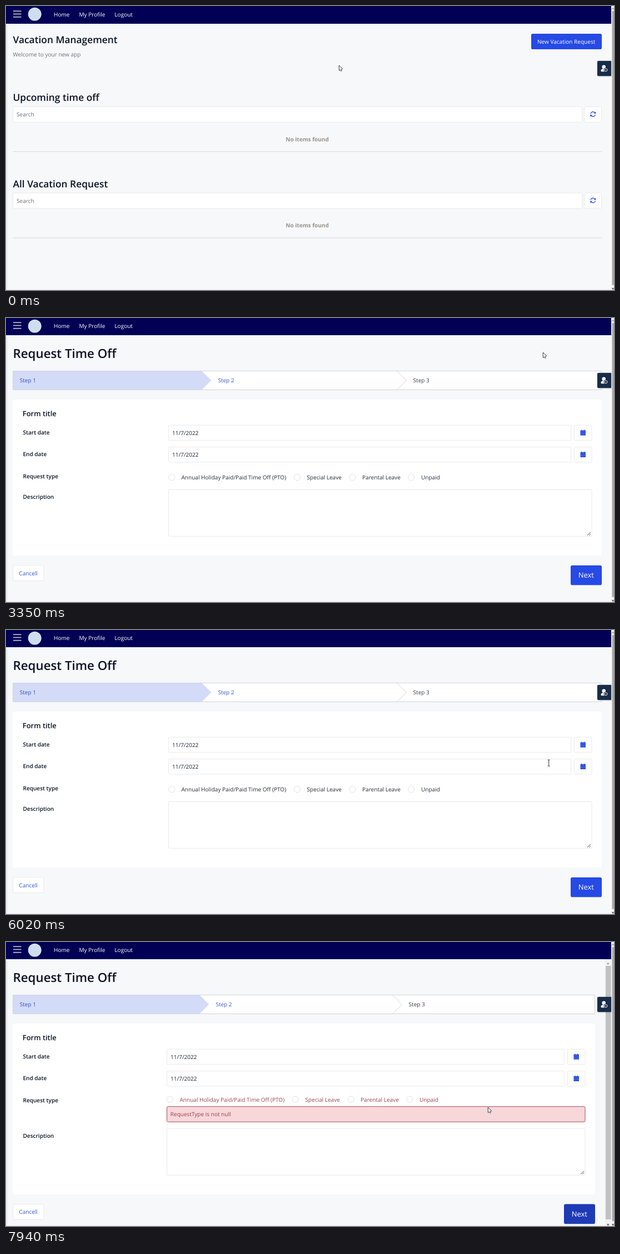
These frames come from a looping animation (1094x512 px, 8000 ms). An HTML page with a canvas:

```html
<!DOCTYPE html>
<html lang="en">
<head>
<meta charset="utf-8">
<title>Time off</title>
<style>
html, body { margin: 0; width: 100%; height: 100%; overflow: hidden; background: #f7f8fa; }
canvas { display: block; width: 1094px; height: 512px; }
</style>
</head>
<body>
<canvas id="stage" width="1094" height="512"></canvas>
<script>
const ctx = document.getElementById('stage').getContext('2d');
const LOOP = 8000, SHIFT_AT = 2100, FORM_AT = 3050, ERROR_AT = 7250;
const BLUE = '#264ae5', BLUE_DARK = '#1e3ab5', INK = '#0a1325', EDGE = '#e7e9ec';
const BODY = 10.05, H1 = 22.3, H2 = 17.35, H3 = 12.95;

// Stops of the pointer: time, x, y
const STOPS = [
  [0, 599, 107], [1050, 954, 68], [1430, 955, 67], [1700, 938, 186], [2500, 887, 61],
  [2900, 966, 62], [3360, 966, 62], [4160, 350, 208], [4858, 350, 219], [5820, 943, 239],
  [6150, 994, 240], [6840, 1040, 448], [7300, 1040, 461], [7940, 867, 298], [LOOP, 867, 298]
];

let pointer, cursor;

function pointerAt(t) {
  const i = STOPS.findIndex(stop => stop[0] > t);
  const [t0, x0, y0] = STOPS[i - 1], [t1, x1, y1] = STOPS[i];
  const u = (t - t0) / (t1 - t0), ease = u * u * (3 - 2 * u);
  return { x: x0 + (x1 - x0) * ease, y: y0 + (y1 - y0) * ease };
}

// True while the pointer is inside the control; also picks the cursor
function hovered(x, y, w, h, kind) {
  const inside = Math.abs(pointer.x - x - w / 2) < w / 2 - 3 &&
    Math.abs(pointer.y - y - h / 2) < h / 2 - 3;
  if (inside) cursor = kind;
  return inside;
}

// y is the middle of the capitals; returns the right end
function text(s, x, y, color = INK, size = BODY, weight = 400) {
  ctx.font = `${weight} ${size}px "Open Sans", sans-serif`;
  ctx.textRendering = 'geometricPrecision';
  ctx.fillStyle = color;
  ctx.fillText(s, x, y + size * 0.357);
  return x + ctx.measureText(s).width;
}

function paint(fill, stroke, width = 1) {
  if (fill) { ctx.fillStyle = fill; ctx.fill(); }
  if (stroke) { ctx.strokeStyle = stroke; ctx.lineWidth = width; ctx.stroke(); }
}

function box(x, y, w, h, fill, stroke, radius = 2) {
  ctx.beginPath();
  ctx.roundRect(x, y, w, h, radius);
  paint(fill, stroke);
}

function rect(x, y, w, h, fill) {
  ctx.fillStyle = fill;
  ctx.fillRect(x, y, w, h);
}

function disc(x, y, r, fill, stroke) {
  ctx.beginPath();
  ctx.arc(x, y, r, 0, 2 * Math.PI);
  paint(fill, stroke);
}

function polygon(points, fill, stroke, width) {
  ctx.beginPath();
  for (const [x, y] of points) ctx.lineTo(x, y);
  ctx.closePath();
  paint(fill, stroke, width);
}

function line(x0, y0, x1, y1, color, width = 1) {
  ctx.beginPath();
  ctx.moveTo(x0, y0);
  ctx.lineTo(x1, y1);
  paint(null, color, width);
}

function triangle(x, y, size, dir, color) {
  polygon([[x - size, y], [x + size, y], [x, y + size * 1.2 * dir]], color);
}

function field(x, y, w, h) {
  box(x, y, w, h, '#fff', EDGE);
  hovered(x, y, w, h, 'beam');
}

function primaryButton(label, x, y, w, h, size, active) {
  const hover = hovered(x, y, w, h, 'hand');
  box(x, y, w, h, hover || active ? BLUE_DARK : BLUE, null, 2.8);
  const pad = size > BODY ? 13.8 : 11;
  text(label, x + pad, y + h / 2, '#fff', size, size > BODY ? 400 : 500);
}

function header(height) {
  const mid = height - 17;
  rect(0, 0, 1089, height, '#020054');
  for (let i = -1; i <= 1; i++) rect(13, mid - 1.4 + i * 5.3, 14.5, 1.8, '#b4b6c8');
  disc(51.7, 14.8, 12, '#cfdeef');
  let x = 86;
  for (const label of ['Home', 'My Profile', 'Logout']) x = text(label, x, mid + 0.3, '#fff', BODY, 500) + 17;
}

function refreshIcon(x, y) {
  ctx.save();
  ctx.translate(x, y);
  for (let half = 0; half < 2; half++) {
    ctx.beginPath();
    ctx.arc(0, 0, 4.2, Math.PI * 1.06, Math.PI * 1.8);
    paint(null, BLUE, 1.4);
    polygon([[5.1, -4.8], [5.1, -0.9], [1.3, -0.9]], BLUE);
    ctx.rotate(Math.PI);
  }
  ctx.restore();
}

function listSection(title, y) {
  text(title, 12.5, y, INK, H2, 600);
  field(12.5, y + 16.5, 1024.5, 28);
  text('Search', 19, y + 30.7, '#6b707b');
  box(1040.5, y + 16.5, 31, 28, '#fff', EDGE);
  refreshIcon(1056.2, y + 30);
  text('No items found', 503.3, y + 75, '#97928a', BODY, 700);
  rect(12.5, y + 97, 1059.5, 1, '#d7dadf');
}

function homePage(shift) {
  ctx.save();
  ctx.translate(0, -shift);
  text('Vacation Management', 12.5, 61.3, INK, H2, 600);
  text('Welcome to your new app', 12.5, 87, '#6c717e');
  primaryButton('New Vacation Request', 945, 50, 127, 28, BODY);
  listSection('Upcoming time off', 165);
  listSection('All Vacation Request', 320.5);
  ctx.restore();
}

function stepper(width) {
  const left = 12.5, top = 95.5, h = 34, mid = top + h / 2;
  box(left, top, width, h, '#fff', '#d0d4da');
  const tips = [1, 2].map(i => left + width * i / 3 + 5.5 - i * 1.8);
  polygon([[left, top], [tips[0] - 17, top], [tips[0], mid], [tips[0] - 17, top + h], [left, top + h]], '#d3dbf8');
  line(tips[1] - 17, top, tips[1], mid, '#c9cdd4', 0.8);
  line(tips[1] - 17, top + h, tips[1], mid, '#c9cdd4', 0.8);
  box(left, top, width, h, null, '#d0d4da');
  ['#3453ab', '#3a5bd9', '#3b404c'].forEach((color, i) =>
    text(`Step ${i + 1}`, (i ? tips[i - 1] : left) + 12.2, mid + 0.3, color));
}

function dateField(label, y, left, right) {
  text(label, 30.5, y - 0.7, INK, BODY, 600);
  field(left, y - 13.5, right - 37.5 - left, 27.5);
  text('11/7/2022', left + 6.5, y + 0.3, '#1d2433');
  box(right - 31.5, y - 13.5, 31.5, 27.5, '#fff', EDGE);
  const x = right - 20.5;
  for (const dx of [1.8, 6.3]) rect(x + dx, y - 5.3, 1.4, 2, BLUE);
  rect(x, y - 4, 9.5, 9, BLUE);
  for (let row = 0; row < 3; row++) rect(x, y - 2.2 + row * 2.4, 9.5, 0.4, '#8296f0');
}

function formPage(error) {
  const cut = error ? 12 : 0, drop = error ? 26.6 : 0;
  const left = error ? 289.5 : 292.5, right = 1054 - cut, edge = 1072 - cut;
  text('Request Time Off', 12.5, 64, INK, H1, 600);
  stepper(edge - 13);
  box(12, 147, edge - 12, 281.3 + drop, '#fff');
  text('Form title', 29.8, 172.8, INK, H3, 600);
  dateField('Start date', 206.7, left, right);
  dateField('End date', 246, left, right);

  text('Request type', 30.5, 285, INK, BODY, 600);
  const radioY = error ? 284 : 287.3;
  let x = left + 5.5;
  for (const label of ['Annual Holiday Paid/Paid Time Off (PTO)', 'Special Leave', 'Parental Leave', 'Unpaid']) {
    disc(x, radioY, 5.6, '#fff', '#e0e2e6');
    x = text(label, x + 17.5, radioY, error ? '#9c444b' : '#262c39') + 19.7;
  }
  if (error) {
    box(left, 296.7, right - left, 27.6, '#f8d7da', '#a8515e');
    text('RequestType is not null', left + 6.3, 310.8, '#97404a');
  }

  text('Description', 30.5, 322.5 + drop, INK, BODY, 600);
  field(left, 309.5 + drop, right - left, 84.2);
  for (const d of [6, 2.8]) line(right - 2 - d, 392 + drop, right - 2, 392 + drop - d, '#3d3d3d', 0.9);

  box(12.5, 446 + drop, 55.5, 27.7, '#fff', EDGE);
  text('Cancell', 23.3, 460.2 + drop, '#3355dc');
  primaryButton('Next', edge - 56, 446 + drop, 56, 35.6, H3, error);
}

function scrollbar(x, top, width, thumbTop, thumbColor) {
  const thumbBottom = 512 - (thumbTop - top);
  rect(x, top, width, 512 - top, '#f1f1f1');
  rect(x + 1, thumbTop, width - 1, thumbBottom - thumbTop, thumbColor);
  triangle(x + width / 2, thumbTop - 3, 2.4, -1, '#9b9b9b');
  triangle(x + width / 2, 508.5, 2.4, 1, '#505050');
}

function pageFrame() {
  const shade = ctx.createLinearGradient(0, 0, 4, 0);
  shade.addColorStop(0, 'rgba(60,65,80,.09)');
  shade.addColorStop(1, 'rgba(60,65,80,0)');
  rect(0, 32, 4, 480, shade);
  ctx.setLineDash([2, 2]);
  line(0, 511.5, 1089, 511.5, '#dfe1e5');
  ctx.setLineDash([]);
  scrollbar(1089.5, 0, 5, 9, '#a9a9a9');
}

function sideTab() {
  ctx.save();
  ctx.shadowColor = 'rgba(0,0,0,.25)';
  ctx.shadowBlur = 3;
  box(1064, 99, 25, 27.3, '#182c49', null, [2, 0, 0, 2]);
  ctx.restore();
  box(1070.5, 113.3, 9.5, 4.9, '#fff', null, [3.5, 0, 0, 1]);
  disc(1075.7, 109.7, 3.3, '#fff');
  disc(1079.4, 115.3, 3.8, '#182c49');
  disc(1079.4, 115.3, 2.5, null, '#fff');
}

const CURSORS = {
  arrow() {
    line(2.5, 6, 4.5, 10.6, '#22222c', 2.6);
    polygon([[0.3, 0], [0.3, 9.3], [6.7, 6.5]], '#fff', '#22222c', 0.9);
    line(2.4, 6, 4.3, 10.2, '#fff', 1.1);
  },
  beam() {
    line(0, -5, 0, 5, '#333');
    for (const y of [-5.5, 5.5]) line(-2, y, 2, y, '#333');
  },
  hand() {
    box(-2.8, 4.5, 8, 8, '#fff', '#171b33', [2, 2, 3, 4]);
    box(-0.8, 0, 2, 7, '#fff', '#171b33', 1);
    rect(-0.3, 4, 1.2, 5, '#fff');
  }
};

function draw(t) {
  const error = t >= ERROR_AT, shift = t >= SHIFT_AT ? 1 : 0;
  pointer = pointerAt(t);
  cursor = 'arrow';
  rect(0, 0, 1094, 512, '#f7f8fa');
  if (t >= FORM_AT) formPage(error);
  else homePage(shift);
  header(32 - shift);
  if (error) scrollbar(1078, 31, 10.5, 43, '#c1c1c1');
  pageFrame();
  sideTab();
  ctx.save();
  ctx.translate(pointer.x, pointer.y);
  CURSORS[cursor]();
  ctx.restore();
}

function tick() {
  draw(performance.now() % LOOP);
  requestAnimationFrame(tick);
}
tick();
</script>
</body>
</html>
```
